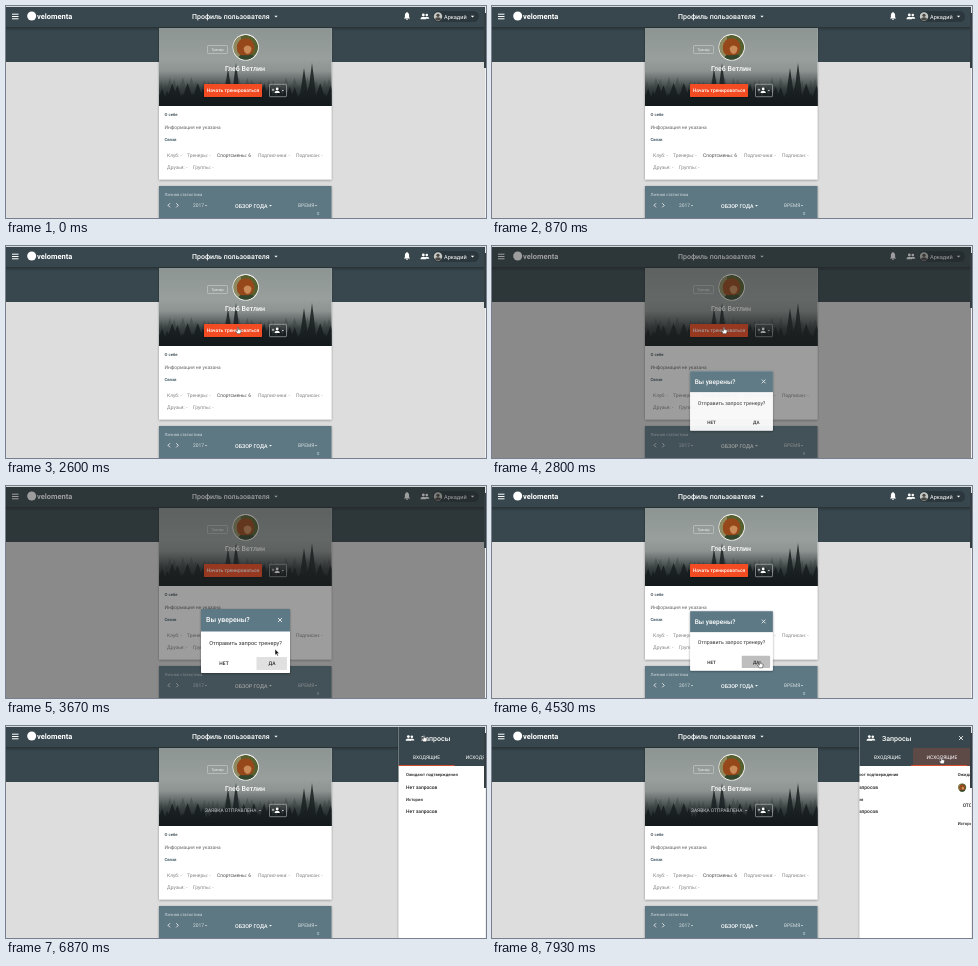
These frames come from a looping animation (480 px wide and 212 px high, 8000 ms). An HTML page:

```html
<!DOCTYPE html>
<html lang="ru">
<head>
<meta charset="utf-8">
<title>Профиль пользователя</title>
<style>
  html, body { margin: 0; width: 100%; height: 100%; overflow: hidden; background: #ddd; }
  svg { display: block; font-family: Roboto, "Open Sans", sans-serif; text-rendering: geometricPrecision; }
  #stage { width: 100vw; height: 100vh; }
</style>
</head>
<body>
<svg id="stage" viewBox="0 0 480 212"></svg>
<script>
const LOOP = 8000;

// Markup helpers
const text = (x, y, size, str, fill = '#fff', extra = '') =>
  `<text x="${x}" y="${y}" font-size="${size}" fill="${fill}" ${extra}>${str}</text>`;
const MEDIUM = ' font-weight="500"';
const MIDDLE = ' text-anchor="middle"';
const rect = (x, y, w, h, fill, extra = '') =>
  `<rect x="${x}" y="${y}" width="${w}" height="${h}" fill="${fill}" ${extra}/>`;
const circle = (x, y, r, fill) => `<circle cx="${x}" cy="${y}" r="${r}" fill="${fill}"/>`;
const path = (d, fill, extra = '') => `<path d="${d}" fill="${fill}" ${extra}/>`;
const stroke = (d, width = 0.9) => path(d, 'none', `stroke="#fff" stroke-width="${width}"`);
const caret = (x, y, s = 1.7, fill = '#fff') => path(`M${x - s} ${y}h${2 * s}l${-s} ${s}z`, fill);
const cross = (x, y) => stroke(`M${x - 2} ${y - 2}l4 4m0-4l-4 4`, 0.8);
const person = (x, y, s = 1) =>
  `<g transform="translate(${x} ${y}) scale(${s})">${circle(0, -1.5, 1.5, '#fff')}` +
  `${path('M-2.9 3c0-3.3 5.8-3.3 5.8 0z', '#fff')}</g>`;
const group = (x, y) => person(x + 1.8, y, 0.85) + person(x - 1.7, y, 0.95);

function forest(base, step, height, fill) {
  let d = '';
  for (let i = 0, x = 151; x < 328; i++, x += step) {
    const top = base - height * (0.5 + 0.5 * Math.sin(i * 2.4 + Math.sin(i)));
    d += `M${x} ${top.toFixed(1)}l${step * 1.1} 16V101H${x - step * 1.1}V${(top + 16).toFixed(1)}z`;
  }
  return path(d, fill);
}
const spruce = (x, top) => path(`M${x} ${top}l5 ${96 - top}h-10z`, '#2a3131');

function portrait(x, y, r) {
  return `<g transform="translate(${x} ${y}) scale(${r / 13})" clip-path="url(#round)">
    ${circle(0, 0, 13, '#56602f')}${rect(-13, -13, 8, 26, '#8d8a62')}
    ${path('M-9 14C-8 4 9 4 11 14z', '#33472c')}
    ${path('M-9 3C-12-12 9-14 9 0C9 7 4 9 0 8C-4 9-8 8-9 3z', '#96481a')}
    ${path('M-2 1C-1-3 5-3 6 1C6 5 4 7 2 7S-2 5-2 1z', '#c98b58')}</g>`;
}

const toolbar = `
  ${rect(0, 0, 480, 56, '#37474d')}${rect(0, 21, 480, 4, 'url(#drop)')}
  ${stroke('M6 8.2h6.5M6 10.5h6.5M6 12.8h6.5', 1)}
  ${circle(25.7, 10, 4.5, '#fff')}
  ${text(31, 12.6, 7.5, 'velomenta', '#fff', 'font-weight="700"')}
  ${text(186, 13, 7, 'Профиль пользователя', '#fff', MEDIUM)}${caret(270, 9.7)}
  ${path('M398 12.2l.9-1V9c0-3.4 4.2-3.4 4.2 0v2.2l.9 1v.4h-6z', '#fff')}${circle(401, 13.2, 0.8, '#fff')}${circle(401, 6.6, 0.6, '#fff')}
  ${group(419, 10.3)}
  ${rect(427, 5, 46, 11, '#2b373c', 'rx="5.5"')}
  ${circle(432, 10.5, 4.2, '#c4c7c4')}${circle(432, 9.3, 1.6, '#4a4643')}${path('M429 13.4c0-3 6-3 6 0q-3 2-6 0z', '#4a4643')}
  ${text(438, 12.6, 5.6, 'Аркадий')}${caret(466.5, 9.7)}`;

// Window edges stay above dialogs and panels
const frameEdge = rect(0, 0, 480, 1, '#d6d8d9') + rect(479, 0, 1, 7, '#e6e6e6') +
  rect(478, 7, 2, 55, '#343e42') + rect(479, 62, 1, 150, '#f0f0f0');

const links = [
  [161, 151, 'Клуб: -'], [181, 151, 'Тренеры: -'], [211, 151, 'Спортсмены: 6', '#4c4c4c'],
  [252, 151, 'Подписчики: -'], [290, 151, 'Подписан: -'], [161, 163, 'Друзья: -'], [187, 163, 'Группы: -']
].map(([x, y, str, fill = '#828282']) => text(x, y, 4.9, str, fill)).join('');

const profile = `
  ${rect(153, 22, 172.5, 151.5, '#fff', 'filter="url(#shadow)"')}
  <svg x="153" y="22" width="172.5" height="78" viewBox="153 22 172.5 78">
    ${rect(153, 22, 173, 78, 'url(#fog)')}
    ${forest(79, 4.3, 8, '#596160')}${rect(153, 55, 173, 45, 'url(#mist)')}
    ${[222, 230, 298, 306].map((x, i) => spruce(x, 62 - i % 2 * 5)).join('')}
    ${forest(87, 5.1, 10, '#272e2e')}${rect(153, 65, 173, 35, 'url(#dusk)')}
  </svg>
  ${rect(201.5, 39.5, 20, 8, 'none', 'rx=".8" stroke="#d4d8d8" stroke-width=".5"')}
  ${text(211.5, 45, 3.7, 'Тренер', '#eef0f0', MIDDLE)}
  ${circle(239.7, 41.3, 13.2, '#f1f1f1')}${portrait(239.7, 41.3, 12.4)}
  ${text(239, 65.3, 7, 'Глеб Ветлин', '#fff', MIDDLE + MEDIUM)}
  <g id="train">${rect(198, 78, 58, 13, '#f34c24', 'rx=".7" filter="url(#shadow)"')}
    ${text(227, 86.3, 4.9, 'Начать тренироваться', '#fff', MIDDLE + MEDIUM)}</g>
  <g id="sent">${text(199, 86.3, 4.9, 'ЗАЯВКА ОТПРАВЛЕНА', '#c4c8c8')}${caret(254, 83.9, 1.2, '#c4c8c8')}</g>
  ${rect(263.5, 78.3, 17, 12.4, 'none', 'rx=".7" stroke="#d6d6d6" stroke-width=".5"')}
  ${person(271.2, 84.3, 0.9)}${stroke('M267 82.6v2.4M265.8 83.8h2.4', 0.6)}${caret(276.9, 84, 1.1)}
  ${text(158.5, 110, 4.2, 'О себе', '#37474f', MEDIUM)}
  ${text(158.5, 123, 4.9, 'Информация не указана', '#666')}
  ${text(158.5, 135, 4.2, 'Связи', '#2f4b5a', MEDIUM)}${links}`;

const PALE = '#d5dde1';
const stats = `
  ${rect(153, 180, 172.5, 36, '#5d7883', 'filter="url(#shadow)"')}
  ${text(158.5, 190.3, 4.2, 'Личная статистика', PALE)}
  ${stroke('M164 197.3l-2 2 2 2M170.3 197.3l2 2-2 2', 0.8)}
  ${text(187, 201.3, 4.9, '2017', PALE)}${caret(200, 199, 1.2, PALE)}
  ${text(229, 201.5, 5.3, 'ОБЗОР ГОДА', '#fff', MEDIUM)}${caret(264.5, 199, 1.4)}
  ${text(292, 201.3, 4.9, 'ВРЕМЯ', PALE)}${caret(310, 199, 1.2, PALE)}
  ${text(311, 209, 4.2, '0', PALE)}`;

const dialog = `<g id="dialog">
  ${rect(195, 123, 89, 64, '#fff', 'rx=".8" filter="url(#shadow)"')}
  ${rect(195, 123, 89, 22.5, '#5d7985')}
  ${text(200, 136.4, 7, 'Вы уверены?', '#fff', MEDIUM)}${cross(274, 134)}
  ${text(239.5, 158.8, 5.6, 'Отправить запрос тренеру?', '#333', MIDDLE)}
  <rect id="yes" x="250.5" y="171" width="30.5" height="13" rx=".7"/>
  ${text(218, 179.3, 4.9, 'НЕТ', '#222', MIDDLE + MEDIUM)}${text(266, 179.3, 4.9, 'ДА', '#222', MIDDLE + MEDIUM)}</g>`;

const heading = (x, y, str) => text(x, y, 4.2, str, '#222', MEDIUM);
const entry = (x, y, str) => text(x, y, 4.9, str, '#222', MEDIUM);
const requests = `<g id="panel">
  ${rect(367.5, 0, 116, 214, '#fff', 'filter="url(#shadow)"')}${rect(367.5, 0, 113, 40, '#37474d')}
  ${group(379, 12)}${text(390, 14.5, 7, 'Запросы', '#fff', MEDIUM)}${cross(469, 12)}
  <rect id="tabGlow" x="421" y="22" width="59" height="18" fill="#e5522d"/>
  ${text(395.5, 32.8, 4.9, 'ВХОДЯЩИЕ', '#fff', MIDDLE)}${text(450, 32.8, 4.9, 'ИСХОДЯЩИЕ', '#fff', MIDDLE)}
  <rect id="ink" x="367.5" y="39.2" width="56" height=".8" fill="#f4512c"/>
  <svg x="367.5" y="40" width="112.5" height="172" viewBox="367.5 40 112.5 172"><g id="pages">
    ${heading(375, 50, 'Ожидают подтверждения')}${entry(375, 63, 'Нет запросов')}
    ${heading(375, 75, 'История')}${entry(375, 87.3, 'Нет запросов')}
    ${heading(486, 50, 'Ожидают подтверждения')}${portrait(490.5, 61.5, 4.2)}${entry(499.5, 63, 'Глеб Ветлин')}
    ${entry(491, 81, 'ОТОЗВАТЬ')}${heading(486, 98.5, 'История')}
  </g></svg></g>`;

const pointer = `<g id="cursor">
  ${path('M0 0V6.2L1.4 4.9 2.3 6.9 3.3 6.4 2.4 4.5H4.3Z', '#111', 'id="arrow" stroke="#fff" stroke-width=".5"')}
  ${path('M-.6.5Q0-.3.6.5V2.6L2.8 3.1Q3.3 3.3 3.1 4.3L2.5 6.8H-.8L-2.5 4Q-2.2 3.1-.6 4.2Z', '#fff', 'id="hand" stroke="#222" stroke-width=".5"')}</g>`;

const gradient = (id, ...stops) => `<linearGradient id="${id}" x2="0" y2="1">` +
  stops.map(([at, color, alpha = 1]) => `<stop offset="${at}" stop-color="${color}" stop-opacity="${alpha}"/>`).join('') +
  '</linearGradient>';

document.getElementById('stage').innerHTML = `<defs>
  ${gradient('drop', [0, '#000', 0.3], [1, '#000', 0])}
  ${gradient('fog', [0, '#8d9592'], [0.4, '#989f9c'], [0.65, '#858c8a'], [1, '#3c4444'])}
  ${gradient('mist', [0, '#8f9693', 0], [0.5, '#858c8a', 0.4], [1, '#4a5252', 0.3])}
  ${gradient('dusk', [0, '#12181a', 0], [0.5, '#12181a', 0.55], [1, '#12181a', 0.95])}
  <clipPath id="round"><circle r="13"/></clipPath>
  <filter id="shadow" x="-10%" y="-10%" width="120%" height="125%"><feDropShadow dx="0" dy=".7" stdDeviation=".9" flood-opacity=".4"/></filter>
  </defs>${rect(0, 0, 480, 212, '#ddd')}${toolbar}${profile}${stats}
  <rect id="backdrop" width="480" height="212" fill="#212121"/>${dialog}${requests}${frameEdge}${pointer}`;

const el = id => document.getElementById(id);
const show = (id, on) => { el(id).style.display = on ? '' : 'none'; };
const progress = (t, start, length) => Math.min(1, Math.max(0, (t - start) / length));
const easeOut = p => 1 - (1 - p) ** 3;
const easeInOut = p => p < 0.5 ? 4 * p ** 3 : 1 - 4 * (1 - p) ** 3;

// Pointer stops: time, x, y
const route = [
  [900, 312, 216], [1550, 233, 87], [1700, 233, 87], [2300, 232, 81], [2950, 232, 81],
  [3620, 269, 163], [3750, 269, 163], [4050, 268, 175], [5000, 268, 175], [5800, 387, 40],
  [6050, 387, 40], [6550, 418, 9], [6900, 418, 9], [7480, 449.5, 31], [LOOP, 449.5, 31]
];
const handTimes = [[1500, 2960], [3920, 4750], [6480, 6960], [7330, LOOP]];

function pointerAt(t) {
  const i = Math.max(1, route.findIndex(stop => stop[0] > t));
  const [t0, x0, y0] = route[i - 1], [t1, x1, y1] = route[i];
  const p = progress(t, t0, t1 - t0), k = p * p * (3 - 2 * p);
  return [x0 + (x1 - x0) * k, y0 + (y1 - y0) * k];
}

function draw(t) {
  const closing = progress(t, 4430, 270);
  const scale = t < 4430 ? 0.5 + 0.5 * easeOut(progress(t, 2680, 250)) : 1 - 0.5 * closing ** 2;
  show('dialog', t > 2680 && closing < 1);
  el('dialog').setAttribute('transform', `translate(239.5 154.5) scale(${scale}) translate(-239.5 -154.5)`);
  el('dialog').setAttribute('opacity', Math.min(progress(t, 2680, 130), 1 - progress(closing, 0.4, 0.6)));
  el('backdrop').setAttribute('opacity', 0.44 * (progress(t, 2680, 110) - progress(t, 4420, 100)));
  show('yes', t > 2950);
  el('yes').setAttribute('fill', t > 4300 ? '#bebebe' : '#e0e0e0');

  show('train', t < 5000);
  show('sent', t >= 5000);

  const opened = easeOut(progress(t, 6750, 300));
  show('panel', opened > 0);
  el('panel').setAttribute('transform', `translate(${118 * (1 - opened)} 0)`);
  const tab = easeInOut(progress(t, 7750, 500));
  el('pages').setAttribute('transform', `translate(${-107 * tab} 0)`);
  el('ink').setAttribute('x', 367.5 + 55 * easeOut(progress(t, 7750, 300)));
  el('tabGlow').setAttribute('opacity', 0.22 * progress(t, 7700, 150));

  const [x, y] = pointerAt(t);
  const hand = handTimes.some(([from, to]) => t >= from && t < to);
  show('cursor', t > 900);
  el('cursor').setAttribute('transform', `translate(${x} ${y})`);
  show('hand', hand);
  show('arrow', !hand);
}

const begin = performance.now();
(function frame() {
  draw((performance.now() - begin) % LOOP);
  requestAnimationFrame(frame);
})();
</script>
</body>
</html>
```
